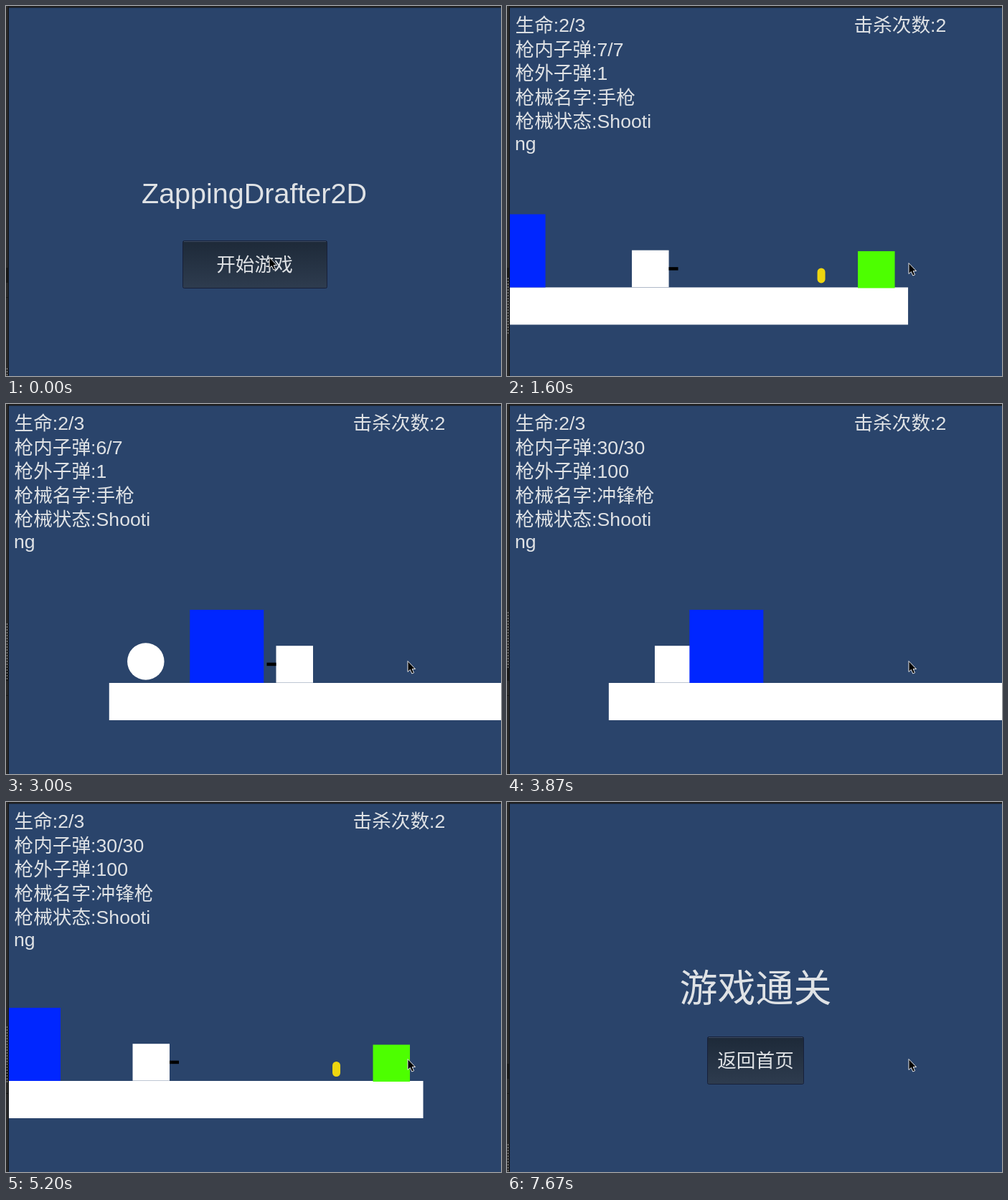
An HTML page with a canvas for the animation above (8 s loop, 690 by 516 pixels).

```html
<!DOCTYPE html>
<html lang="zh">
<head>
<meta charset="utf-8">
<style>
  html, body { margin: 0; width: 100%; height: 100%; overflow: hidden; background: #2a446b; }
  canvas { display: block; }
</style>
</head>
<body>
<canvas id="stage" width="690" height="516"></canvas>
<script>
const ctx = document.getElementById('stage').getContext('2d');
const FONT = '"Liberation Sans", "Noto Sans CJK SC", "Noto Sans CJK", sans-serif';
const LOOP = 8000, STEP = 200 / 3;
const START = 330, GOAL = 7070, END = 7400;
const KILL = 1600, PICK_RIFLE = 3720, PICK_AMMO = 6795;
const TURN_LEFT = 1943, TURN_RIGHT = 3860;
const SIZE = 51.5, FLOOR = 389, FOLLOW_MS = 145;

// The player's walks: start time, end time, distance
const walks = [
  [START, 1000, 14], [2020, 2200, -37], [2700, 3800, -243],
  [3840, 4800, 260], [5705, GOAL, 284],
];

const clamp01 = v => Math.min(1, Math.max(0, v));

function playerX(t) {
  return walks.reduce((x, [from, to, distance]) =>
    x + distance * clamp01((t - from) / (to - from)), 322);
}

function dropHeight(t) {
  const seconds = (t - START) / 1000;
  return Math.max(0, 123 - 138 * seconds ** 2);
}

const facesLeft = t => t >= TURN_LEFT && t < TURN_RIGHT;

// The camera eases after the player and shows more room ahead of it.
function groundAt(time) {
  const dt = 5, ease = 1 - Math.exp(-dt / FOLLOW_MS);
  let x = -36, y = 450;
  for (let t = START; t < time; t += dt) {
    const goal = Math.min(144, (facesLeft(t) ? 466 : 174) - playerX(t));
    x += (goal - x) * ease;
    y += (FLOOR + dropHeight(t) - y) * ease;
  }
  return { x, y };
}

function rect(color, x, y, w, h) {
  ctx.fillStyle = color;
  ctx.fillRect(x, y, w, h);
}

function pill(color, x, y, w, h) {
  ctx.beginPath();
  ctx.roundRect(x, y, w, h, Math.min(w, h) / 2);
  ctx.fillStyle = color;
  ctx.fill();
}

function text(str, x, y, size = 26.67, align = 'left') {
  ctx.font = `500 ${size}px ${FONT}`;
  ctx.textAlign = align;
  ctx.fillStyle = '#dfe2e5';
  ctx.fillText(str, x, y);
}

function button(label, x, w, pressed) {
  const y = 327, h = 67;
  const fill = ctx.createLinearGradient(0, y, 0, y + h);
  fill.addColorStop(0, pressed ? '#17202b' : '#1d2938');
  fill.addColorStop(1, pressed ? '#253140' : '#2e3c4f');
  ctx.beginPath();
  ctx.roundRect(x + 0.5, y + 0.5, w - 1, h - 1, 2);
  ctx.fillStyle = fill;
  ctx.fill();
  ctx.strokeStyle = '#17203a';
  ctx.stroke();
  rect('#3d4c62', x + 2, y + 1, w - 4, 1);
  text(label, 346.5, 369.5, 26.67, 'center');
}

function cursor(x, y) {
  ctx.save();
  ctx.translate(x, y);
  ctx.fillStyle = '#000';
  ctx.strokeStyle = '#e8e8e8';
  const arrow = new Path2D('M0 0V15L3.4 12L5.8 17.5L8.6 16.3L6.2 11H10.6Z');
  ctx.fill(arrow);
  ctx.stroke(arrow);
  ctx.restore();
}

function hud(t) {
  const rifle = t >= PICK_RIFLE, killed = t >= KILL;
  const shooting = (t >= 1330 && t < 1720) || t >= 2130;
  const pistolAmmo = (killed ? 7 : 4) - (shooting && (t < KILL || t >= 2130) ? 1 : 0);
  const spare = t >= PICK_AMMO ? 110 : rifle ? 100 : 1;
  [
    '生命:2/3',
    '枪内子弹:' + (rifle ? '30/30' : pistolAmmo + '/7'),
    '枪外子弹:' + spare,
    '枪械名字:' + (rifle ? '冲锋枪' : '手枪'),
    '枪械状态:' + (shooting ? 'Shooti' : 'Idle'),
  ].forEach((line, i) => text(line, 11.5, 36 + i * 33.5));
  if (shooting) text('ng', 11, 201);
  text('击杀次数:' + (killed ? 2 : 1), 483.5, 36);
}

function level(t) {
  const ground = groundAt(t);
  const x = ground.x + playerX(t);
  const y = ground.y - dropHeight(t) - SIZE - 0.3;

  rect('#fff', ground.x, ground.y, 721, 52);
  if (t < PICK_RIFLE) pill('#fff', ground.x + 25.3, ground.y - 55.7, SIZE, SIZE);
  if (t < KILL) rect('#f51109', ground.x + 520, y - 0.7, SIZE, SIZE);
  rect('#4dff00', ground.x + 651, ground.y - 50.5, SIZE, SIZE);
  if (t < PICK_AMMO) pill('#eed60f', ground.x + 594.5, ground.y - 27, 11, 21);
  rect('#fff', x, y, SIZE, SIZE);
  rect('#000', facesLeft(t) ? x - 13 : x + SIZE, y + 23.5, 13, 4.5);
  rect('#0026ff', ground.x + 112.5, ground.y - 102, 103, 102);
}

function windowEdges(t) {
  rect('#202020', 0, 0, 690, 2);
  rect('#1e2d45', 0, 2, 690, 1);
  rect('#282828', 0, 0, 3, 516);
  rect('#121418', 3, 0, 1, 516);
  rect('#171717', 0, 365, 3, 21);
  rect('#171717', 0, 406, 3, 1);
  const top = Math.round(505 - 215 * Math.sin(Math.PI * t / LOOP));
  for (let y = top; y < top + 80; y += 4) rect('#999', 1, y, 1, 2);
}

function draw(t) {
  rect('#2a446b', 0, 0, 690, 516);
  if (t < START) {
    text('ZappingDrafter2D', 346, 274.5, 39.5, 'center');
    button('开始游戏', 246, 202, t >= 60);
  } else if (t < END) {
    level(Math.min(t, GOAL));
    hud(t);
  } else {
    text('游戏通关', 346.5, 279, 53, 'center');
    button('返回首页', 279, 135, false);
  }
  windowEdges(t);
  const moved = clamp01((t - START) / 520);
  cursor(367 + 193 * moved, 350.5 + 8 * moved);
}

const begin = performance.now();
function tick() {
  const elapsed = (performance.now() - begin) % LOOP;
  const step = Math.floor((elapsed + 3.4) / STEP);
  draw(Math.round(step * STEP / 10) * 10 % LOOP);
  requestAnimationFrame(tick);
}
tick();
</script>
</body>
</html>
```
